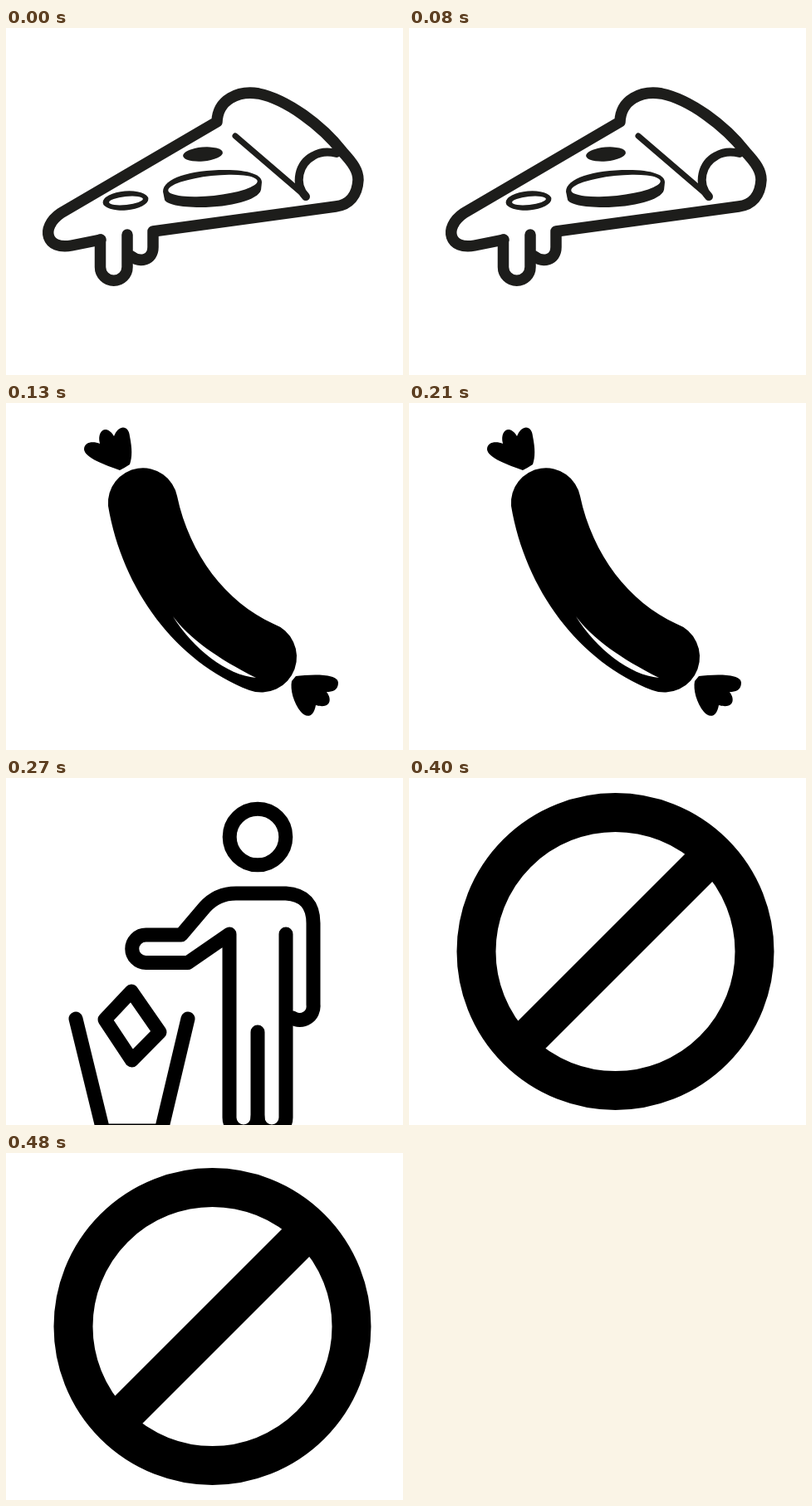
An HTML page that plays this animation: 478 by 418 pixels, repeating every 0.54 s.

```html
<!DOCTYPE html>
<html lang="en">
<head>
<meta charset="utf-8">
<title>No littering food</title>
<style>
html, body { margin: 0; width: 100%; height: 100%; overflow: hidden; background: #fff; }
svg { display: block; }
svg > g { visibility: hidden; }
.line { fill: none; stroke: #000; stroke-linecap: round; stroke-linejoin: round; }
.dark { stroke: #1d1d1b; }
</style>
</head>
<body>
<svg width="478" height="418" viewBox="0 0 478 418">
  <!-- pizza slice -->
  <g>
    <g class="line dark" stroke-width="13.500">
      <path d="M114 255L79 262C49 268 40 241 66 223L254 113C255 86 280 75 304 79C338 86 380 117 405 149C418 163 424 172 424 183C423 202 413 213 397 215L177 245V264C177 280 161 283 151 275"/>
      <path d="M113.500 255V288A16.250 16.250 0 0 0 146 288V249"/>
      <path d="M361 203C346 187 353 163 370 154Q382 147 398 151" stroke-width="10"/>
      <path d="M276 130L361 203" stroke-width="7"/>
    </g>
    <g fill="#1d1d1b">
      <ellipse cx="237" cy="152" rx="24" ry="8.500" transform="rotate(-5 237 152)"/>
      <path d="M189 197C189 181 222 171 264 171C293 171 308 177 308 186L307 195C304 207 270 216 234 216C209 216 193 212 191 207Z"/>
      <ellipse cx="144" cy="208" rx="27.500" ry="11.500" transform="rotate(-5 144 208)"/>
    </g>
    <g fill="#fff">
      <ellipse cx="249" cy="190" rx="54" ry="12" transform="rotate(-6 249 190)"/>
      <ellipse cx="144.500" cy="208" rx="20.500" ry="5" transform="rotate(-6 144 208)"/>
    </g>
  </g>
  <!-- sausage -->
  <g>
    <path d="M123 124A42 42 0 0 1 206 112C221 183 265 240 322 266A42 42 0 0 1 293 346C205 312 140 225 123 124Z"/>
    <path d="M137 81C120 75 95 66 94 56C94 46 106 46 113 49C109 33 121 25 130 40C136 25 148 27 149 40C152 55 152 65 149 74Q143 78 137 81Z"/>
    <path d="M349 329C365 327 400 325 400 337C400 346 393 348 386 348C393 357 391 369 373 364C370 380 361 379 355 372C346 361 342 345 344 335Z"/>
    <path fill="#fff" d="M201 257C220 283 255 308 301 331C266 328 225 296 201 257Z"/>
  </g>
  <!-- person at the bin -->
  <g class="line" stroke-width="17">
    <circle cx="303" cy="71" r="33.800"/>
    <path d="M303 306V409A17 17 0 0 1 269 409V188L219 222.500H168.500A16.750 16.750 0 0 1 168.500 189H211L239 156Q254 139 277 139H337Q370 141 370 175V273A16.500 16.500 0 0 1 345 289"/>
    <path d="M337 188V409A17 17 0 0 1 303 409"/>
    <path d="M84 290L117 425H187L219 290"/>
    <path d="M151 257L185 306L151.500 340L119 291Z"/>
  </g>
  <!-- prohibition sign -->
  <g class="line" stroke-width="47">
    <circle cx="248.500" cy="209" r="167.500"/>
    <path d="M348 109L148 309"/>
  </g>
</svg>
<script>
const scenes = document.querySelectorAll("svg > g");
const ends = [130, 270, 400, 540];
const start = performance.now();

function draw() {
  const t = (performance.now() - start) % 540;
  const current = ends.findIndex(end => t < end);
  scenes.forEach((g, i) => g.style.visibility = i === current ? "visible" : "hidden");
  requestAnimationFrame(draw);
}
draw();
</script>
</body>
</html>
```
